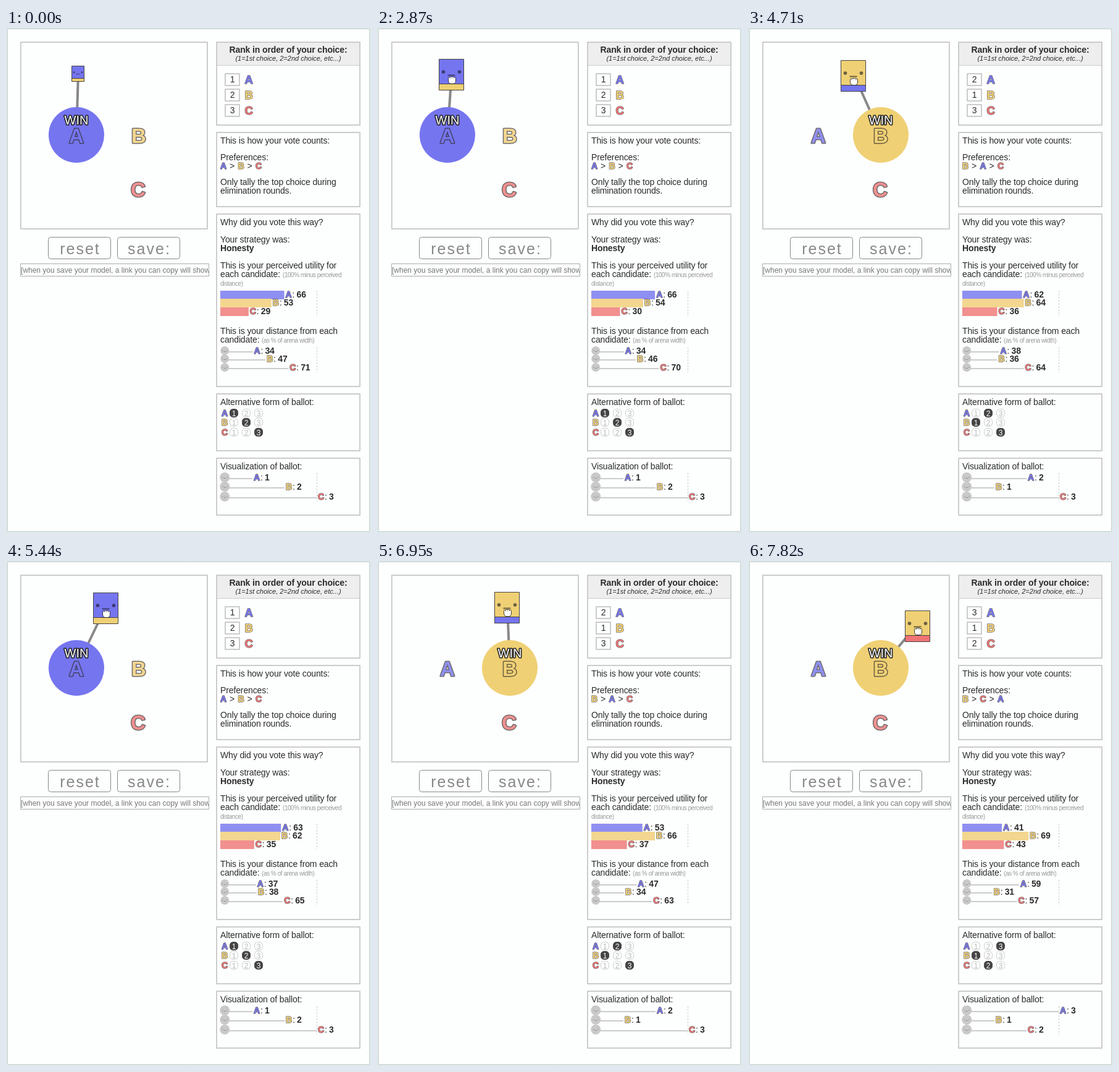
Animation, 591 px wide and 817 px high, one loop 8000 ms. Source, as an HTML page with a canvas:

```html
<!DOCTYPE html>
<html lang="en">
<head>
<meta charset="utf-8">
<title>Ranked ballot</title>
<style>
html, body { margin: 0; width: 100%; height: 100%; overflow: hidden; background: #dceae9; }
canvas { display: block; }
</style>
</head>
<body>
<canvas id="stage" width="591" height="817"></canvas>
<script>
const g = document.getElementById('stage').getContext('2d');
const LOOP = 8000, STEP = 125, ARENA = 299;
const SHOW = 530, HOVER = 2170, GRAB = 2620;
const LEFT = 347, SPAN = 156;
const INK = '#2b2b2b', LINE = '#ccc', PAPER = '#fdfefe';

const style = (font, gap = 0) => ({ font: font + 'px "Liberation Sans", Arial, sans-serif', gap: gap + 'px' });
const BODY = style(14, -0.12), BOLD = style('bold 14', -0.12), HINT = style('italic 11');
const NOTE = style(10, -0.45), DIGIT = style(12), BUTTON = style(25, 2), BANNER = style(20);

const cands = [
  { name: 'A', x: 114, y: 173, color: '#7575ef', soft: '#8f8ff1' },
  { name: 'B', x: 215, y: 173, color: '#efd074', soft: '#f3d68f' },
  { name: 'C', x: 214, y: 260, color: '#f07474', soft: '#f28f8f' }
];

// Paths: a start point, then moves of from (ms), to (ms), x, y
const arrowPath = {
  x: 39, y: 799,
  moves: [[530, 800, 108, 697], [800, 1430, 266, 270], [1430, 1670, 160, 140], [1670, 1910, 130, 86]]
};
const voterPath = {
  x: 117, y: 72.5,
  moves: [
    [2735, 3400, 137, 69.5], [3800, 3950, 152, 69.5], [3950, 4310, 178, 75], [4590, 5070, 150, 72],
    [5200, 5680, 174, 74.5], [6470, 6950, 211, 71.5], [6950, 7310, 245, 78], [7310, 7820, 275, 101.5]
  ]
};

// Moves advance in even, visible steps
function along({ x, y, moves }, t) {
  for (const [from, to, tx, ty] of moves) {
    if (t < from) break;
    const n = Math.round((to - from) / STEP);
    const k = Math.min(1, Math.floor((t - from) / (to - from) * n + 0.001) / n);
    x += (tx - x) * k;
    y += (ty - y) * k;
  }
  return { x, y };
}

function setType({ font, gap }, align) {
  g.font = font;
  g.letterSpacing = gap;
  g.textAlign = align;
}

function text(s, x, y, type = BODY, color = INK, align = 'left') {
  setType(type, align);
  g.fillStyle = color;
  g.fillText(s, x, y);
}

function outlined(s, x, y, type, fill, edge, width, align = 'left') {
  setType(type, align);
  g.lineJoin = 'round';
  g.strokeStyle = edge;
  g.lineWidth = width;
  g.strokeText(s, x, y);
  g.fillStyle = fill;
  g.fillText(s, x, y);
}

function letter(c, x, y, size = 14) {
  outlined(c.name, x, y, style('bold ' + size), c.color, 'rgba(60,50,50,.7)', 1.5);
}

function line(x1, y1, x2, y2, color, width) {
  g.strokeStyle = color;
  g.lineWidth = width;
  g.beginPath();
  g.moveTo(x1, y1);
  g.lineTo(x2, y2);
  g.stroke();
}

function frame(x, y, w, h, width = 2, color = LINE) {
  g.strokeStyle = color;
  g.lineWidth = width;
  g.strokeRect(x + width / 2, y + width / 2, w - width, h - width);
}

function box(x, y, w, h, color) {
  g.fillStyle = color;
  g.fillRect(x, y, w, h);
}

function disc(x, y, r, color) {
  g.fillStyle = color;
  g.beginPath();
  g.arc(x, y, r, 0, 2 * Math.PI);
  g.fill();
}

function pill(x, y, w, h, r, edge, fill = PAPER) {
  g.beginPath();
  g.roundRect(x, y, w, h, r);
  g.fillStyle = fill;
  g.fill();
  g.strokeStyle = edge;
  g.lineWidth = 1;
  g.stroke();
}

function face(x, y, s, color) {
  disc(x - 13 * s, y, 2.8 * s, color);
  disc(x + 13 * s, y, 2.8 * s, color);
  line(x - 6 * s, y + 5.5 * s, x + 6 * s, y + 5.5 * s, color, Math.max(1, 2 * s));
}

function limit(y1, y2) {
  g.setLineDash([3, 2]);
  line(503.5, y1, 503.5, y2, LINE, 1);
  g.setLineDash([]);
}

function label(c, value, x, y) {
  letter(c, x + 2, y);
  text(':', x + 13, y);
  text(value, x + 20, y, BOLD);
}

function slider(c, value, share, y, r) {
  const end = LEFT + share * SPAN;
  line(LEFT + 7, y + 2, end, y + 2, LINE, 2);
  disc(LEFT + 7.2, y, r, '#c9c9c9');
  face(LEFT + 7.2, y, 0.27, '#8c8c8c');
  label(c, value, end, y + 5);
}

function page() {
  box(0, 0, 591, 817, '#dceae9');
  box(2, 1, 587, 814, PAPER);
  frame(2, 1, 587, 814, 1, '#c6cfcf');
  frame(23, 22, 304, 304);

  ['reset', 'save:'].forEach((s, i) => {
    const x = 68 + 112 * i;
    pill(x + 0.5, 338.5, 101, 35, 4, '#888');
    text(s, x + 52, 365.5, BUTTON, '#888', 'center');
  });

  frame(23, 381, 306, 21, 1, '#aaa');
  g.save();
  g.beginPath();
  g.rect(24, 382, 304, 19);
  g.clip();
  text('[when you save your model, a link you can copy will show', 24, 396, DIGIT, '#777');
  g.restore();
}

function arena(voter, big, order) {
  const win = cands[order[0]], next = cands[order[1]];
  line(voter.x, voter.y, win.x, win.y, '#888', 4);
  disc(win.x, win.y, 45, win.color);
  for (const c of cands) {
    outlined(c.name, c.x, c.y + 12.5, style('bold 33'), c === win ? c.color : c.soft,
      'rgba(50,45,45,.7)', 3, 'center');
  }
  outlined('WIN', win.x, win.y - 17, BANNER, '#fff', '#222', 3.2, 'center');

  const s = big ? 1 : 0.5;
  const x = Math.round(voter.x - 20.3 * s) - 0.5, y = Math.round(voter.y - 20.9 * s) - 0.5;
  box(x, y, 40 * s, 40 * s, win.color);
  box(x, y + 40 * s, 40 * s, 10 * s, next.color);
  frame(x - 0.5, y - 0.5, 40 * s + 1, 50 * s + 1, 1, '#444');
  line(x, y + 40 * s, x + 40 * s, y + 40 * s, '#444', 1);
  face(x + 20 * s, y + 20.5 * s, s, 'rgba(20,20,30,.6)');
}

function rankPanel(rank) {
  box(342, 24, 230, 37, '#eee');
  line(342, 60.5, 572, 60.5, LINE, 1);
  text('Rank in order of your choice:', 457, 40, BOLD, INK, 'center');
  text('(1=1st choice, 2=2nd choice, etc...)', 457, 53, HINT, INK, 'center');
  cands.forEach((c, i) => {
    const y = 73 + 25 * i;
    frame(354, y, 25, 21);
    text(rank[i], 366.5, y + 15, BODY, INK, 'center');
    letter(c, 386.5, y + 17, 18.5);
  });
}

function countPanel(order) {
  text('This is how your vote counts:', LEFT, 187);
  text('Preferences:', LEFT, 214);
  order.forEach((c, i) => {
    const x = LEFT + 28.5 * i;
    letter(cands[c], x, 228);
    if (i < 2) text('>', x + 15, 228);
  });
  text('Only tally the top choice during', LEFT, 254);
  text('elimination rounds.', LEFT, 268);
}

function whyPanel(dist) {
  text('Why did you vote this way?', LEFT, 319);
  text('Your strategy was:', LEFT, 347);
  text('Honesty', LEFT, 361, BOLD);
  text('This is your perceived utility for', LEFT, 389);
  text('each candidate:', LEFT, 403);
  text('(100% minus perceived', 448, 403, NOTE, '#999');
  text('distance)', LEFT, 417, NOTE, '#999');
  text('This is your distance from each', LEFT, 495);
  text('candidate:', LEFT, 509);
  text('(as % of arena width)', 414, 509, NOTE, '#999');
  limit(425, 466);
  limit(516, 557);
  cands.forEach((c, i) => {
    const d = dist[i], pct = Math.round(d * 100);
    const y = Math.floor(13.5 * i), width = (1 - d) * SPAN;
    box(LEFT, 425 + y, width, 14, c.soft);
    label(c, 100 - pct, LEFT + width, 436 + y);
    slider(c, pct, d, 522 + y, 7);
  });
}

function ballotPanels(rank) {
  text('Alternative form of ballot:', LEFT, 610);
  text('Visualization of ballot:', LEFT, 714);
  limit(720, 766);
  cands.forEach((c, i) => {
    const gap = Math.floor(15.5 * i), y = 623 + gap;
    slider(c, rank[i], rank[i] / 3, 727 + gap, 8);
    letter(c, 349, y + 5);
    for (let n = 1; n <= 3; n++) {
      const x = 349 + 20 * n, on = rank[i] === n;
      pill(x - 6.5, y - 6.5, 13, 13, 5, on ? '#444' : LINE, on ? '#444' : PAPER);
      text(n, x, y + 4.5, DIGIT, on ? '#fff' : '#bbb', 'center');
    }
  });
}

function panels(dist, order) {
  const rank = cands.map((c, i) => order.indexOf(i) + 1);
  for (const [y, h] of [[22, 136], [168, 122], [300, 281], [591, 94], [695, 94]]) frame(340, y, 234, h);
  rankPanel(rank);
  countPanel(order);
  whyPanel(dist);
  ballotPanels(rank);
}

function arrow({ x, y }) {
  g.save();
  g.translate(x, y);
  g.scale(1.45, 1.45);
  g.fillStyle = '#000';
  g.fill(new Path2D('M0 0V16L3.7 12.6 6.2 18.6 8.6 17.6 6.1 11.8 11.2 11.4Z'));
  g.restore();
}

function hand(x, y, open) {
  const top = y - (open ? 8 : 3.5);
  g.lineCap = 'round';
  for (const [color, grow] of [['#222', 1.6], ['#fff', 0]]) {
    for (let i = 0; i < 4; i++) {
      const fx = x - 4.2 + 2.8 * i;
      line(fx, top + Math.abs(i - 1.5) - 0.5, fx, y + 1, color, 2.6 + grow);
    }
    line(x - 1.5, y + 2, x + 1.7, y + 2, color, 7.5 + grow);
  }
  g.lineCap = 'butt';
}

function draw(t) {
  const voter = along(voterPath, t);
  const dist = cands.map(c => Math.hypot(c.x - voter.x, c.y - voter.y) / ARENA);
  const order = [0, 1, 2].sort((a, b) => dist[a] - dist[b]);
  page();
  panels(dist, order);
  arena(voter, t >= GRAB, order);
  if (t >= HOVER) hand(voter.x + 0.5, voter.y + 12, t < GRAB);
  else if (t >= SHOW) arrow(along(arrowPath, t));
}

const begin = performance.now();
function tick() {
  draw((performance.now() - begin) % LOOP);
  requestAnimationFrame(tick);
}
tick();
</script>
</body>
</html>
```
